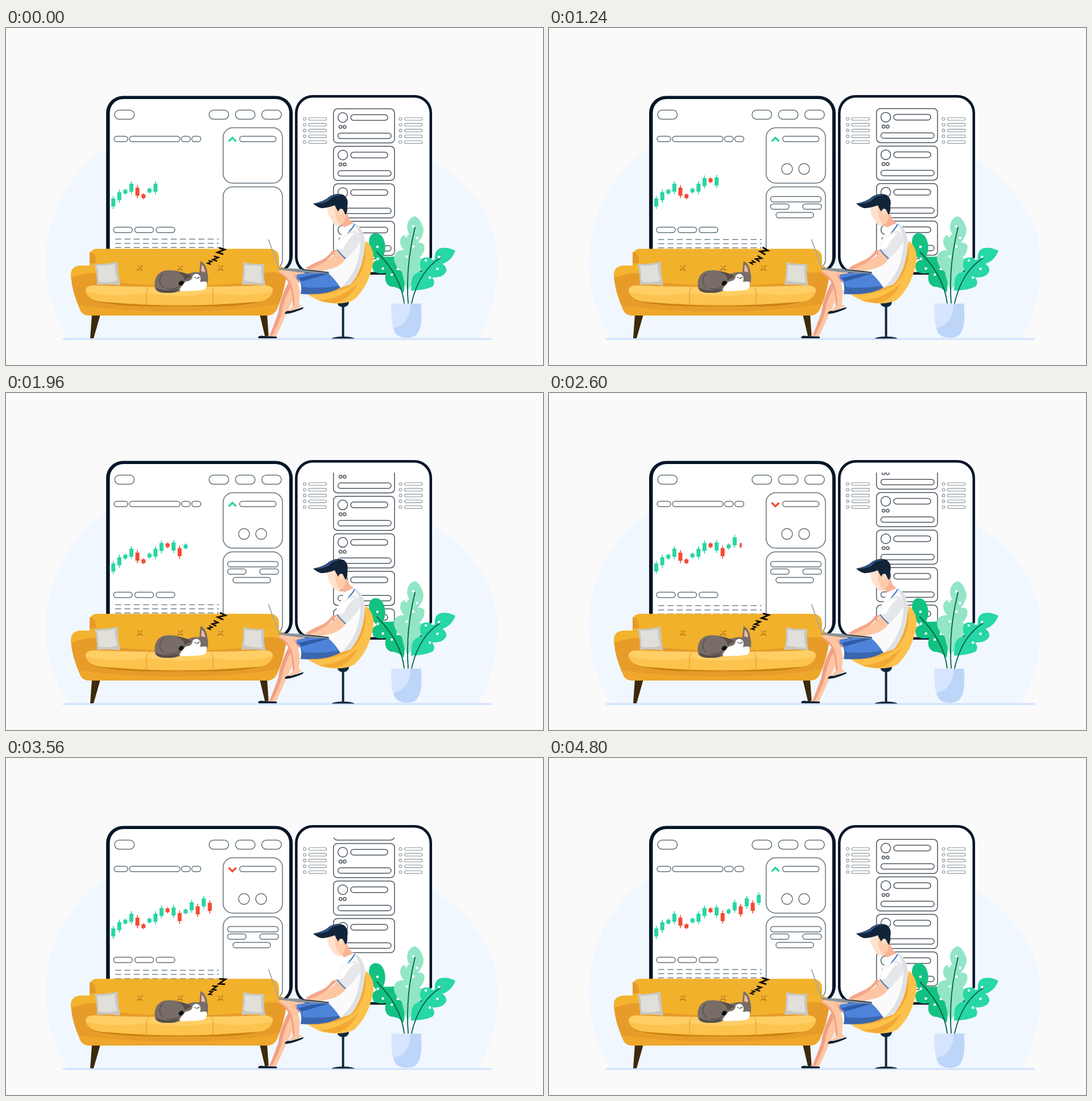
An HTML page that plays this animation: 944 by 593 pixels, repeating every 4840 ms.

```html
<!DOCTYPE html>
<html lang="en">
<head>
<meta charset="utf-8">
<title>Trading from the living room</title>
<style>
html, body { margin: 0; width: 100%; height: 100%; overflow: hidden; background: #fafafa; }
svg { display: block; width: 944px; height: 593px; }
.line { fill: none; stroke: #63717b; stroke-width: 1.5; }
.card { fill: none; stroke: #4b555f; stroke-width: 1.5; }
.thin { fill: none; stroke: #8d969d; stroke-width: 1.1; }
.vein { fill: none; stroke: #07614a; stroke-width: 1.8; stroke-linecap: round; }
.spots { fill: none; stroke: #fff; stroke-width: 4.6; stroke-linecap: round; stroke-dasharray: 0 21; }
</style>
</head>
<body>
<svg viewBox="0 0 944 593">
  <defs><clipPath id="listClip"><rect x="570" y="140" width="120" height="279"/></clipPath></defs>
  <path fill="#f0f7ff" d="M110 547C60 470 55 370 105 285C130 245 155 222 180 212L750 232C800 260 840 310 857 360C872 420 862 490 830 547Z"/>
  <path stroke="#d4e4fb" stroke-width="3.5" stroke-linecap="round" d="M101.500 547.300H852"/>

  <g id="desk">
    <rect x="176" y="119.500" width="328" height="312" rx="30" fill="#061527"/>
    <rect x="182.500" y="125" width="315.500" height="302" rx="24" fill="#fff"/>
    <g id="deskLines" class="line"></g>
    <path id="arrow" fill="none" stroke-width="3.200"/>
    <path id="dashes" stroke="#74828b" stroke-width="1.500" stroke-dasharray="10.500 5.750"/>
    <g id="candles"></g>
  </g>
  <g id="phone">
    <rect x="508" y="118" width="241" height="316" rx="31" fill="#061527"/>
    <rect x="512.500" y="122.500" width="232" height="307" rx="27" fill="#fff"/>
    <g id="sideLists" class="thin"></g>
    <g clip-path="url(#listClip)"><g id="list" class="card"></g></g>
  </g>

  <g id="sofa">
    <path fill="#3d2a0d" d="M151 504H166L154 546H148ZM446 504H459L462 546H456Z"/>
    <path fill="#f2b12b" d="M147 470V406Q146 389 160 388.500H463Q480 389 480 406V470Z"/>
    <path fill="#e69a29" d="M147 402V394Q153 395 157 401L158 414H147ZM180 446Q310 461 446 446V462H180Z"/>
    <path fill="#e79c29" d="M114 436Q114 418 134 418H166Q181 420 181 440V452H432V440Q434 419 449 417H475Q493 419 493 436Q488 470 476 495Q470 506 458 506H148Q134 506 130 495Q116 465 114 436Z"/>
    <path fill="#f4b32f" d="M114 434Q114 418 134 418H166Q181 420 181 437Q160 429 142 432Q128 434 114 440ZM432 440Q434 419 449 417H475Q493 419 493 436Q478 428 460 430Q442 432 432 440Z"/>
    <path fill="#eea62b" d="M127 488Q210 499 306 499Q410 498 480 485L475 497Q470 506 458 506H148Q134 506 130 495Z"/>
    <path fill="#c9830f" d="M148 478Q306 500 456 478Q430 489 365 490H247Q176 488 148 478Z"/>
    <path fill="#fdc34f" d="M140 464Q139 453 155 453Q305 459 455 453Q470 454 469 464Q463 481 440 482Q305 493 170 482Q146 480 140 464Z"/>
    <path fill="#ffcf66" d="M140 463Q140 453 155 453Q305 459 455 453Q470 454 469 463Q420 475 365 466Q306 476 247 466Q185 476 140 463Z"/>
    <path fill="none" stroke="#dc952a" stroke-width="1" d="M247 490V465Q247 458 252 457M364 490V465Q364 458 360 457"/>
    <g id="tufts"></g>
    <path fill="#c9c7c1" d="M156 415Q178 416 196 411Q197 434 201 453Q179 450 160 452Q160 434 156 415ZM417 412Q434 416 454 415Q452 434 456 453Q433 450 414 452Q417 435 417 412Z"/>
    <path fill="#e0dfda" d="M160 418Q178 419 191 415Q191 430 196 444Q180 450 162 446Q163 432 160 418ZM419 417Q435 419 449 418Q448 432 451 448Q434 448 418 444Q421 430 419 417Z"/>
  </g>

  <g id="dog">
    <path fill="#786d67" d="M262 458Q258 434 278 427Q298 424 318 433Q331 428 340 430L342 410Q353 416 354 431Q358 444 351 456Q342 464 307 462Q300 466 286 466Q265 467 262 458Z"/>
    <path fill="#564d49" d="M264 457Q281 466 304 458Q302 466 286 466Q265 467 264 457ZM300 429Q317 430 326 437L314 444Q313 433 300 429Z"/>
    <path fill="none" stroke="#514944" stroke-width="1.200" d="M277 457Q264 445 276 432M305 454Q296 461 282 459"/>
    <path fill="#f2b6a3" d="M344 416Q350 421 350 430L343 428Z"/>
    <path fill="#fff" d="M305 460Q309 453 316 446Q328 445 328 436Q333 430 339 434Q344 439 341 447Q350 445 353 447Q354 456 349 460Q341 463 307 463Z"/>
    <path fill="none" stroke="#35302e" stroke-width="1.100" d="M331 438Q335 443 340 438"/>
    <ellipse cx="308" cy="449" rx="5" ry="3.700" transform="rotate(-38 308 449)" fill="#111"/>
  </g>
  <g id="zzz" fill="none" stroke="#080808"></g>

  <g id="plant">
    <path fill="#13c282" d="M650 361Q638 361 638 378Q639 396 652 409Q640 412 646 428Q655 434 668 431Q663 449 676 455Q690 455 699 466Q702 450 700 437Q698 424 686 426Q693 410 682 402Q670 403 663 402Q671 385 662 368Q657 361 650 361Z"/>
    <path fill="#92e6c5" d="M719 331Q705 335 705 352Q706 358 709 364Q692 362 693 378Q694 385 700 391Q682 390 682 407Q684 420 696 429Q699 446 706 462Q722 440 732 420Q737 408 727 404Q738 393 735 382Q731 376 724 378Q737 362 733 350Q728 335 719 331Z"/>
    <path fill="#27d7a5" d="M790 392Q775 384 762 388Q752 393 754 408Q738 400 730 407Q725 416 731 428Q714 431 713 446Q712 456 712 462Q735 462 750 455Q756 448 749 439Q769 440 774 428Q775 420 767 415Q783 410 790 392Z"/>
    <path class="vein" d="M652 394Q694 436 700 484M719 351Q702 420 707 484M763 405Q726 428 713 484"/>
    <path class="spots" d="M653 385Q652 426 664 423T683 449M716 349L703 367L726 370L700 409M738 388L738 415L762 397L758 427L739 445"/>
    <path fill="#d6e5fe" d="M677.500 485H729.500Q733 520 722 540Q716 545 704 545Q690 545 684 538Q676 520 677.500 485Z"/>
    <path fill="#bcd5f8" d="M729.500 485H711Q712 520 681 528Q686 545 704 545Q730 546 730 510Z"/>
  </g>

  <g id="chair">
    <path fill="#10273c" d="M582 482H603Q602 490 594.500 491V543Q608 543 613 546.500H572Q577 543 590.500 543V491Q583 490 582 482Z"/>
    <path fill="#fcc14b" d="M632 374Q650 388 645 415Q637 455 612 478Q592 489 557 482Q540 476 528 467L585 455Q615 440 630 400Z"/>
    <path fill="#f2a934" d="M631 378Q638 420 609 451Q588 467 540 470L588 452Q618 430 631 378ZM549 479Q588 478 620 448Q602 482 575 484Z"/>
  </g>

  <g id="person">
    <path fill="#fdc6a3" d="M497 447Q481 478 479 500Q472 520 464 540Q458 543 452 544H474Q486 519 494 500Q505 480 509 460Z"/>
    <path fill="#f29f83" d="M497 447Q481 478 479 500Q472 520 464 540L468 541Q481 517 485 500Q489 475 503 452Z"/>
    <path fill="#0d2033" d="M443 545Q444 540 453 542L476 543V546H445Z"/>
    <path fill="#fdc6a3" d="M480 427Q490 423 505 427L535 433L522 452L511 443Q518 462 516 472L515 487L521 489Q510 495 497 500L492 499Q503 493 504 488Q504 466 498 450Q492 439 480 431Z"/>
    <path fill="#f29f83" d="M480 429Q496 436 502 452Q507 470 507 488L504 489Q504 466 498 450Q492 439 480 431ZM505 433L520 439L514 449Z"/>
    <path fill="#0d2033" d="M490 502Q492 497 500 498Q514 494 523 491L522 494Q505 502 492 503Z"/>
    <path fill="#3a66ae" d="M514 441Q540 432 568 432L589 456Q565 471 518 468Q522 452 514 441Z"/>
    <path fill="#4d83d9" d="M511 434Q540 428 570 431L588 453Q555 459 522 456Q520 447 511 441Z"/>
    <path fill="#2f5ba5" d="M514 440Q542 432 571 431Q548 438 520 446Z"/>
    <path fill="#fafafa" d="M594 353L612 343Q630 352 631 380Q628 425 606 451L588 457Q577 440 566 431Q578 415 579 395Q578 382 589 366Z"/>
    <path fill="#dfe0e3" d="M612 343Q630 352 631 380Q628 425 606 451L588 457Q616 434 622 392Q627 365 612 343Z"/>
    <path fill="#f6a78b" d="M584 390L573 392Q567 402 555 408Q536 416 526 423L545 428Z"/>
    <path fill="#fdc6a3" d="M583 391L597 406Q591 417 574 423L545 430L529 426Q548 420 561 411Q574 405 583 391Z"/>
    <path fill="#e6e7ea" d="M612 357Q628 364 622 378Q612 393 597 407L581 391Q589 371 600 362Z"/>
    <path fill="#fff" d="M589 374Q601 359 614 361Q602 369 593 388Q585 390 582 389Z"/>
    <path fill="none" stroke="#3b76bd" stroke-width="2" d="M582 390Q589 399 597 406M600 361Q608 355 613 345"/>
    <path fill="#f8b395" d="M590 326L601 329Q602 338 611 343L598 356Q592 349 588 342Z"/>
    <path fill="#fff" d="M594 351L612 343L600 362L591 365Z"/>
    <path fill="#ffe2cd" d="M566 312Q563 328 572 337Q576 348 586 349Q595 343 598 329Q597 316 581 310Z"/>
    <path fill="#ffcdab" d="M579 314Q577 330 583 340L588 348Q595 343 598 329L588 316Z"/>
    <path fill="#112439" d="M540 309Q560 305 568 297Q581 289 594 294Q603 301 600 314Q601 323 597 329L592 319Q587 317 584 323Q580 317 578 312Q564 317 554 317Q545 314 540 309Z"/>
    <path fill="#31578b" d="M540 309Q560 306 568 298Q578 291 589 294Q574 294 567 304Q557 310 540 309Z"/>
    <ellipse cx="589" cy="323" rx="4" ry="5" fill="#ffdabc"/>
    <path stroke="#a6abb0" stroke-width="2" d="M461.500 372L480 424"/>
    <path fill="#8a939a" d="M479 422L520 424L568 430V432L515 430L480 425Z"/>
    <path stroke="#1b2b3b" stroke-width="1.500" d="M520 425L567 430"/>
  </g>
</svg>
<script>
const LOOP = 4840;
const $ = id => document.getElementById(id);
const repeat = (n, fn) => [...Array(n).keys()].map(fn).join('');
const clamp = v => Math.max(0, Math.min(1, v));
const ease = p => p * p * (3 - 2 * p);
const wave = (t, period) => Math.sin(2 * Math.PI * t / period);
const rect = (x, y, w, h, r = h / 2) => `<rect x="${x}" y="${y}" width="${w}" height="${h}" rx="${r}"/>`;
const circle = (x, y, r) => `<circle cx="${x}" cy="${y}" r="${r}"/>`;
const bar = (x, y, w) => rect(x, y, w, 9.5);

// Items that pop in: they grow around a pivot, or only in height when flat
const pops = [];
function addPop(parent, html, start, x, y, flat) {
  parent.insertAdjacentHTML('beforeend', `<g>${html}</g>`);
  pops.push({ node: parent.lastElementChild, start, x, y, flat });
}

const lines = $('deskLines');
lines.innerHTML =
  rect(191, 144.5, 34.5, 16) + repeat(3, i => rect(357 + 46.3 * i, 144.5, 34.5, 16)) +
  bar(190, 190.5, 24) + bar(217, 190.5, 89) + bar(308.5, 190.5, 15.5) + bar(326.5, 190.5, 16) +
  repeat(3, i => bar(189 + 37.4 * i, 350.5, 33)) +
  rect(381.7, 175.5, 104.3, 97.5, 17) + rect(381.7, 279.5, 104.3, 145, 17) + bar(410.7, 190.5, 64);
for (const x of [418.5, 448.5]) addPop(lines, circle(x, 248, 9.5), 80, x, 248);
[[389.5, 296.5, 89], [446, 309.5, 33], [389.5, 309.5, 32.5], [399, 324.5, 66]]
  .forEach(([x, y, w], i) => addPop(lines, bar(x, y, w), 200 + 150 * i, x, y, true));

// One price per candle; calm ones are short, wicks follow the body height
const prices = [307, 296, 288, 281, 288, 296, 286, 281, 271, 268, 270, 280, 270, 261, 268, 254, 262, 248];
const calm = [2, 5, 6, 9, 12];
const falling = [4, 5, 9, 11, 14, 16];
prices.forEach((y, i) => {
  const x = 188.6 + 10.6 * i;
  const body = calm.includes(i) ? 6.5 : 14;
  const wick = body * 1.65;
  const color = falling.includes(i) ? '#f44a35' : '#28d5a3';
  addPop($('candles'),
    `<path fill="${color}" d="M${x - 3.5} ${y - body / 2}h7v${body}h-7ZM${x - 0.8} ${y - wick / 2}h1.6v${wick}h-1.6Z"/>`,
    i < 8 ? -1000 : 80 + 400 * (i - 8), x, y);
});

$('sideLists').innerHTML = repeat(5, i => {
  const y = 160 + 10.2 * i;
  return [525, 693.5].map(x => circle(x, y, 2.5) + rect(x + 7, y - 2.3, 31.5, 4.6)).join('');
});
$('list').innerHTML = repeat(6, i => `<g transform="translate(0 ${66 * i})">` +
  rect(575.7, 0.3, 107.3, 60, 7) + circle(592, 15.5, 8.5) + rect(606, 10.5, 65, 10) +
  circle(588, 32, 2.6) + circle(595.3, 32, 2.6) + bar(583.5, 43, 93.5) + '</g>');
$('tufts').innerHTML = repeat(3, i => `<g transform="translate(${235 + 71 * i} 422)">` +
  '<path fill="#b17a16" d="M0 0l-6-5 6 3 6-3-4 5 4 6-6-3-6 3 4-6Z"/><circle r="2.600" fill="#e0a02a"/></g>');
$('zzz').innerHTML = repeat(3, i => {
  const s = 3.2 * 1.3 ** i;
  return `<path stroke-width="${2 + 0.4 * i}" d="M${-s} ${-s * 0.8}H${s}L${-s} ${s * 0.8}H${s}"/>`;
});

// Eased value at time t along [time, value] keys
function along(keys, t) {
  const i = keys.findIndex(([time]) => time > t);
  if (i < 0) return keys[keys.length - 1][1];
  const [t0, a] = keys[i - 1], [t1, b] = keys[i];
  return a + (b - a) * ease((t - t0) / (t1 - t0));
}
// Pull down, two swipes up, then back to the top
const scrollKeys = [[0, 142], [440, 157], [1000, 142], [1200, 142], [2100, 43], [2720, 43],
  [3440, -49.5], [3540, -49.5], [3920, 143]];

function draw(t) {
  for (const { node, start, x, y, flat } of pops) {
    const s = ease(clamp((t - start) / 240));
    node.setAttribute('visibility', s ? 'visible' : 'hidden');
    node.setAttribute('transform', `translate(${x} ${y}) scale(${flat ? 1 : s} ${s}) translate(${-x} ${-y})`);
  }
  const down = t >= 2300 && t < 4100;
  $('arrow').setAttribute('d', down ? 'M391.5 193l6.500 6.500 6.500-6.500' : 'M391.5 199.500l6.500-6.500 6.500 6.500');
  $('arrow').setAttribute('stroke', down ? '#f44a35' : '#28d5a3');
  const y = 371.6 + 3 * wave(Math.min(t, 4480), 2160) ** 2;
  $('dashes').setAttribute('d', repeat(3, i => `M192 ${y + 7.3 * i}H374`));
  $('list').setAttribute('transform', `translate(0 ${along(scrollKeys, t)})`);
  const turn = 18 + 14 * wave(t, LOOP);
  [...$('zzz').children].forEach((z, i) => {
    const sway = wave(t + 500, LOOP) * (i === 1 ? 1 : -1);
    const x = 358.7 + 7.5 * i + 1.3 * i * i + 1.3 * sway;
    const cy = 413 - 5.3 * i - 2.4 * i * i + 0.7 * sway;
    z.setAttribute('transform', `translate(${x} ${cy}) rotate(${turn})`);
  });
}

function tick(now) {
  draw(now % LOOP);
  requestAnimationFrame(tick);
}
tick(performance.now());
</script>
</body>
</html>
```
